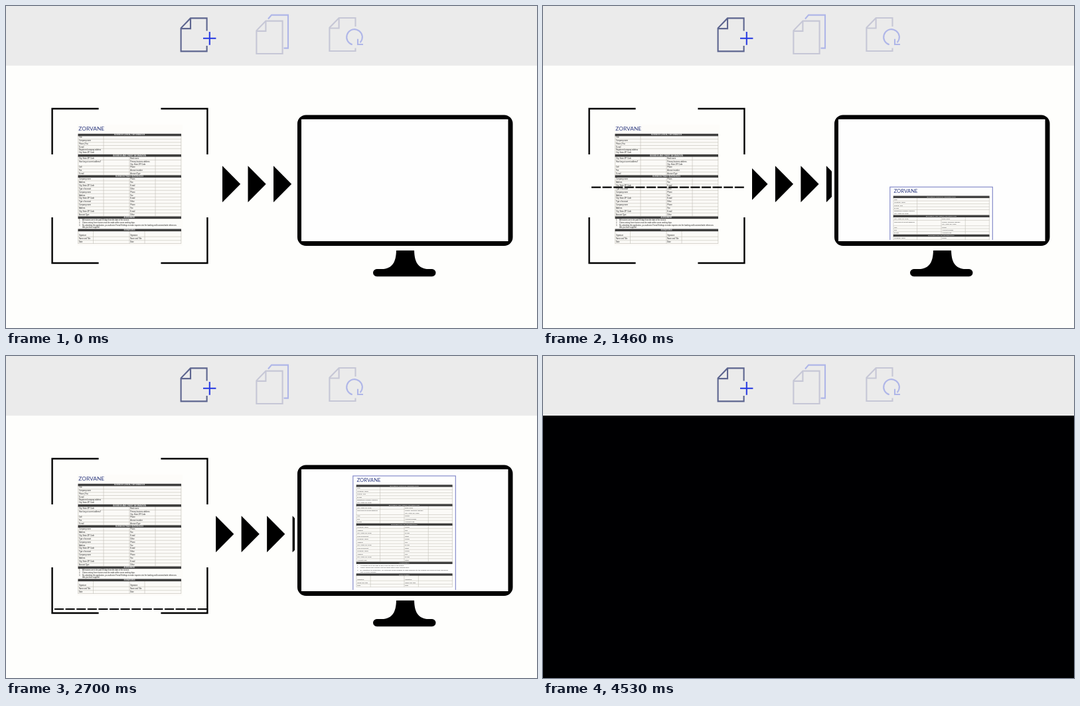
An HTML page with a canvas that plays this animation: 800 by 486 pixels, repeating every 4560 ms.

```html
<!DOCTYPE html>
<html lang="en">
<head>
<meta charset="utf-8">
<title>Scan to screen</title>
<style>
  html, body { margin: 0; width: 100%; height: 100%; overflow: hidden; background: #fefefc; }
  canvas { display: block; }
</style>
</head>
<body>
<canvas id="stage" width="800" height="486"></canvas>
<script>
const ctx = document.getElementById('stage').getContext('2d');
const LOOP = 4560, STEP = 100 / 3;
const SANS = '"Liberation Sans", Arial, sans-serif';

const ADDRESS = 'City, State ZIP Code';
// One trade reference: four rows of two labels, starting at y.
const reference = (y, last = 'Type of account') => [
  [y, 'Company name', 'Phone'], [y + 4.9, 'Address', 'Fax'],
  [y + 9.6, ADDRESS, 'E-mail'], [y + 14.5, last, 'Other']
];
const SECTIONS = [
  { bar: 194.6, title: 'BUSINESS CONTACT INFORMATION', columns: [147], rows: [
    [198.7, 'Title'], [203.5, 'Company name'], [208.2, 'Phone | Fax'], [213, 'E-mail'],
    [217.6, 'Registered company address'], [221.6, ADDRESS]] },
  { bar: 225.8, title: 'BUSINESS AND CREDIT INFORMATION', columns: [147, 186, 225], rows: [
    [230.2, ADDRESS, 'Bank name'],
    [235, 'How long at current address?', 'Primary business address'],
    [239, '', ADDRESS], [243.6, 'Cell', 'Phone'],
    [248.3, 'Fax', 'Account number'], [253, 'E-mail', 'Account Type']] },
  { bar: 257.2, title: 'BUSINESS/TRADE REFERENCES', columns: [147, 186, 225], rows: [
    ...reference(261.5), ...reference(281), ...reference(300.5, 'Account Type')] },
  { bar: 319.4, title: 'AGREEMENT', columns: [], rows: [] },
  { bar: 338.3, title: 'SIGNATURES', columns: [131.5, 186, 209], rows: [
    [346, 'Signature', 'Signature'], [351.4, 'Name and Title', 'Name and Title'],
    [356.2, 'Date', 'Date']] }
];
const TERMS = [
  [323.5, '1.', 'All invoices are to be paid 30 days from the date of the invoice.'],
  [327.4, '2.', 'Claims arising from invoices must be made within seven working days.'],
  [331.2, '3.', 'By submitting this application, you authorize Fenwil Holdings to make inquiries into the banking and business/trade references'],
  [334.6, '', 'that you have supplied.']
];

function stroke(points, color, width, close) {
  ctx.beginPath();
  points.forEach(([x, y]) => ctx.lineTo(x, y));
  if (close) ctx.closePath();
  ctx.strokeStyle = color;
  ctx.lineWidth = width;
  ctx.stroke();
}

function box(x, y, w, h, color) {
  ctx.fillStyle = color;
  ctx.fillRect(x, y, w, h);
}

function label(text, x, y, color = '#222', font = `2.55px ${SANS}`, align = 'left') {
  ctx.font = font;
  ctx.textAlign = align;
  ctx.fillStyle = color;
  ctx.fillText(text, x, y);
}

function clipped(x, y, w, h, draw) {
  ctx.save();
  ctx.beginPath();
  ctx.rect(x, y, w, h);
  ctx.clip();
  draw();
  ctx.restore();
}

function form() {
  const rule = (x1, y1, x2, y2) => stroke([[x1, y1], [x2, y2]], '#bdbab0', 0.55);
  ctx.textBaseline = 'middle';
  label('ZORVANE', 109.3, 185.6, '#2d3a80', '8.4px Lato, sans-serif');
  for (const { bar, title, columns, rows } of SECTIONS) {
    if (rows.length) {
      const end = rows[rows.length - 1][0] + 2.3;
      box(108.5, bar, 155.5, end - bar, '#fbfaf7');
      columns.forEach(x => rule(x, bar, x, end));
      [108.7, 263.8].forEach(x => rule(x, bar, x, end));
    }
    rows.forEach(([y, left, right = ''], i) => {
      const next = rows[i + 1];
      if (!next || next[0] - y > 4.2) rule(108.5, y + 2.3, 264, y + 2.3);
      label(left, 110, y);
      label(right, 187.2, y);
    });
    box(108.5, bar - 1.8, 155.5, 3.6, '#3e3e3e');
    label(title, 186, bar + 0.1, '#e6e6e6', `bold 2.65px ${SANS}`, 'center');
  }
  for (const [y, number, text] of TERMS) {
    label(number, 110, y);
    label(text, 115, y);
  }
}

function page(x, y, w, h, fold, color, gap) {
  const r = x + w, b = y + h;
  const edge = [[r, y], [x + fold, y], [x, y + fold + 0.5], [x, b], [r, b]];
  if (gap) stroke([[r, gap[0]], ...edge, [r, gap[1]]], color, 2.1);
  else stroke(edge, color, 2.1, true);
  stroke([[x + fold, y], [x + fold, y + fold + 1.3], [x, y + fold + 1.3]], color, 2.1);
}

function toolbar() {
  const gray = '#c6c7d6', blue = '#afb6e8', bright = '#2b3de2';
  box(0, 0, 800, 90, '#ebebeb');

  page(263.6, 18.4, 39, 50, 14.4, '#5d658f', [37.5, 60]);
  stroke([[306.8, 39], [306.8, 58.8]], bright, 2.1);
  stroke([[297, 48.8], [316.4, 48.8]], bright, 2.1);

  stroke([[395, 19.5], [400, 13.6], [425, 13.6], [425, 63.6], [418.5, 63.6]], blue, 2.1);
  page(377.4, 22.6, 39.2, 49.4, 14, gray);

  page(487.4, 18, 39.1, 50, 14.2, gray, [31, 63.5]);
  ctx.beginPath();
  ctx.arc(525, 47, 11.8, 1.85, 7.05);
  ctx.strokeStyle = blue;
  ctx.stroke();
  stroke([[530, 49.8], [530, 58], [538, 58]], blue, 2.1);
}

function brackets() {
  for (const [x, dx] of [[69.6, 70], [303.4, -70]])
    for (const [y, dy] of [[155, 69], [388, -69]])
      stroke([[x + dx, y], [x, y], [x, y + dy]], '#000', 2.4);
}

function monitor() {
  ctx.fillStyle = '#000';
  ctx.beginPath();
  ctx.roundRect(439, 164.5, 324.5, 197.5, 13);
  ctx.roundRect(553, 397, 94.5, 11.2, 5.6);
  ctx.fill();
  ctx.beginPath();
  ctx.moveTo(588, 369);
  ctx.lineTo(615, 369);
  ctx.bezierCurveTo(615.5, 386, 620, 396, 637, 397.5);
  ctx.lineTo(566, 397.5);
  ctx.bezierCurveTo(583, 396, 587.5, 386, 588, 369);
  ctx.fill();
  box(445, 171, 311.5, 184, '#fefefe');
}

function arrows(n) {
  const gap = 38.5, moving = Math.min(n, 87.8);
  // The arrows skip one step at the start and hold one midway.
  const skip = n < 1 ? 0 : n < 57 ? 6.5 : 1;
  const shift = (326 + 6.52 * moving + skip) % gap;
  clipped(315, 235, 120, 70, () => {
    ctx.fillStyle = '#000';
    for (let x = 269.5 + shift; x < 435; x += gap) {
      ctx.beginPath();
      ctx.moveTo(x, 241.3);
      ctx.lineTo(x + 27.2, 268.8);
      ctx.lineTo(x, 296.3);
      ctx.fill();
    }
  });
}

function scanLine(n) {
  const y = 203.5 + 2.926 * (n - 20);
  if (y < 153.5 || y > 388) return;
  ctx.setLineDash([14, 2.6]);
  stroke([[73, y], [302.8, y]], '#000', 2.2);
  ctx.setLineDash([]);
}

function screenCopy(n) {
  const rise = Math.max(175.5, 333 - 2.492 * (n - 20));
  const top = rise - 3.85 * Math.max(0, n - 101);
  clipped(445, 175, 311, 178, () => {
    ctx.save();
    ctx.translate(527.7, top + 15);
    ctx.scale(0.932, 0.932);
    ctx.translate(-108.5, -194.6);
    form();
    ctx.restore();
    ctx.strokeStyle = '#7a80c6';
    ctx.lineWidth = 1.1;
    ctx.strokeRect(522.8, top, 154.5, 176);
  });
}

function draw(time) {
  const n = Math.floor((time + 7) / STEP);
  box(0, 0, 800, 486, '#fefefc');
  toolbar();
  if (n >= 136) {
    box(0, 90, 800, 396, '#000002');
    return;
  }
  box(107, 179, 159, 183, '#fdfcf9');
  form();
  brackets();
  scanLine(n);
  arrows(n);
  monitor();
  screenCopy(n);
}

const start = performance.now();
function tick() {
  draw((performance.now() - start) % LOOP);
  requestAnimationFrame(tick);
}
tick();
</script>
</body>
</html>
```
